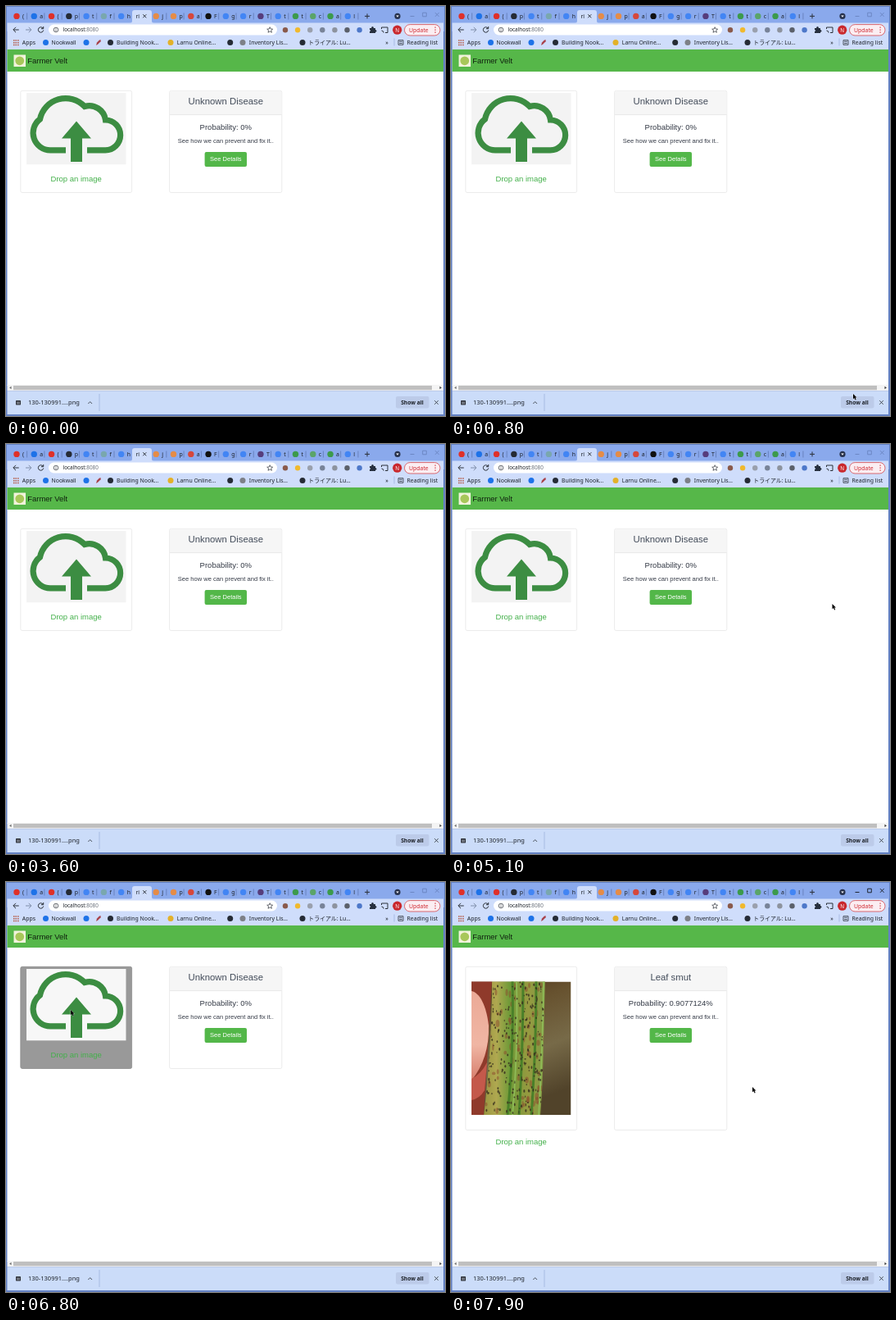
An HTML page for the animation above (8000 ms loop, 536 by 500 pixels).

```html
<!DOCTYPE html>
<html lang="en">
<head>
<meta charset="utf-8">
<title>Leaf check</title>
<style>
  html, body { margin: 0; width: 100%; height: 100%; overflow: hidden; background: #fff; }
  svg { display: block; }
  text { font-family: "Liberation Sans", Arial, sans-serif; font-size: 7.55px; fill: #343a46; }
  .ui text { font-family: "Noto Sans", "Noto Sans CJK JP", sans-serif; font-size: 6.9px; fill: #1c2128; }
  .mid { text-anchor: middle; }
  text.title { font-size: 11.35px; fill: #434c5a; }
  text.sub { font-size: 9.5px; }
  text.drop { font-size: 9.5px; fill: #43b04a; }
  .line { fill: none; stroke: #2b3038; stroke-width: 1; }
  .card { fill: #fff; stroke: #e6e6e6; stroke-width: .8; }
</style>
</head>
<body>
<svg width="536" height="500" viewBox="0 0 536 500">
  <defs>
    <linearGradient id="soil" x2=".3" y2="1">
      <stop offset="0" stop-color="#4f321c"/><stop offset=".3" stop-color="#67522f"/>
      <stop offset=".65" stop-color="#776a48"/><stop offset="1" stop-color="#51432a"/>
    </linearGradient>
    <linearGradient id="blade">
      <stop offset="0" stop-color="#96943f"/><stop offset=".22" stop-color="#b0a850"/><stop offset=".42" stop-color="#6f9a38"/>
      <stop offset=".7" stop-color="#969a40"/><stop offset="1" stop-color="#7d9a45"/>
    </linearGradient>
    <linearGradient id="skin" x2="0" y2="1">
      <stop offset="0" stop-color="#eba996"/><stop offset=".6" stop-color="#f0b6a4"/><stop offset="1" stop-color="#d67d6c"/>
    </linearGradient>
    <clipPath id="photoClip"><path d="M25 121.5h121.5V284H25z"/></clipPath>
    <clipPath id="bladeClip"><path d="M50 121H115C113 180 113 240 109 285H40C46 235 50 180 50 121z"/></clipPath>
  </defs>

  <rect width="536" height="500" fill="#6482c4"/>
  <rect x="1" y="1" width="534" height="30" fill="#8aa9ec"/>
  <rect x="1.5" y="53" width="532.5" height="410" fill="#fff"/>

  <g class="ui">
    <path d="M151 21q3 0 3-3V8q0-3 3-3h18q3 0 3 3v10q0 3 3 3z" fill="#cfddfb"/>
    <rect x="1.5" y="20.5" width="532.5" height="32.5" fill="#cfddfb"/>
    <g id="tabs"></g>
    <text x="158.5" y="14.8">ri</text>
    <path class="line" d="M167.3 10.3l4 4m0-4l-4 4M438 12.4h6m-3-3v6"/>
    <circle cx="478" cy="12.4" r="3.6" fill="#27324d"/>
    <path d="M476.2 11.5h3.6l-1.8 2.3z" fill="#fff"/>
    <path id="controls" class="line" d="M493.5 12.5h5M508.7 8.2h4.6v4.6h-4.6zM524 8.2l4.6 4.6m0-4.6L524 12.8"/>

    <path class="line" d="M15.7 29H9m3-3.2L8.8 29l3.2 3.2"/>
    <path class="line" d="M24 29h6.7m-3-3.2l3.2 3.2-3.2 3.2" style="stroke:#7f8da9"/>
    <path class="line" d="M45.2 27.2A3.2 3.2 0 1 0 45.7 29.5M45.7 25v2.7H43"/>
    <rect x="52" y="22.5" width="279" height="13" rx="6.5" fill="#fff"/>
    <circle class="line" cx="61" cy="29" r="2.8" style="stroke-width:.7"/>
    <path class="line" d="M61 28.5v2.2M61 27.1v.7" style="stroke-width:.7"/>
    <text x="69.5" y="31.4" style="font-size:6.4px">localhost<tspan fill="#6c737d">:8080</tspan></text>
    <path class="line" d="M322.2 25.7l1 2.3 2.5.2-1.9 1.6.6 2.5-2.2-1.4-2.2 1.4.6-2.5-1.9-1.6 2.5-.2z" style="stroke-width:.7"/>
    <g id="addons"></g>
    <path d="M444 27h2q.2-2 1.5-2t1.5 2h2v2q1.5.2 1.5 1.4T451 31.8V33h-7v-2q1.2-.3 1.2-1t-1.2-1z" fill="#27303e"/>
    <path class="line" d="M458.5 28v-2h7.5v6.5h-3M458.5 30q2.4 0 2.6 2.6"/>
    <circle cx="477.7" cy="29.2" r="5.6" fill="#c9282d"/>
    <text class="mid" x="477.7" y="31.6" style="fill:#fff;font-size:6.3px">N</text>
    <rect x="486.5" y="22.6" width="43.5" height="13.4" rx="6.7" fill="#fbeef2" stroke="#d65a60" stroke-width=".9"/>
    <text x="492" y="31.8" style="fill:#cf2830;font-weight:500">Update</text>
    <path d="M523.5 25.5h1.2v1.2h-1.2zm0 3h1.2v1.2h-1.2zm0 3h1.2v1.2h-1.2z" fill="#cf2830"/>

    <g id="bookmarks"></g>
    <path class="line" d="M9 42h6.5M9 44.7h6.5M9 47.4h6.5" stroke-dasharray="1.5 1" style="stroke:#b4543f;stroke-width:1.5"/>
    <path d="M110 48l1-3.5 3-3 1.8-.2-.2 2-3 3z" fill="#a9434b"/>
    <text x="463.3" y="47">»</text>
    <path d="M474 39.5v9" stroke="#9fb3df" stroke-width=".8"/>
    <path class="line" d="M479 41.7h6v5.6h-6zM480.2 43.3h3.6m-3.6 2.2h3.6" style="stroke-width:.8"/>
    <text x="489.5" y="47">Reading list</text>
  </g>

  <rect x="1.5" y="53" width="532.5" height="27" fill="#56b749"/>
  <rect x="9.5" y="59.5" width="14.5" height="14.5" fill="#f2f3dc"/>
  <circle cx="16.7" cy="66.8" r="5.4" fill="#a8c75a"/>
  <text x="26.3" y="70" style="font-size:9.45px;fill:#10200f">Farmer Velt</text>

  <rect id="dropCard" class="card" x="17.8" y="103.3" width="135.8" rx="2"/>
  <g id="cloud">
    <rect id="cloudBack" x="25" y="106" width="121.5" height="87.3"/>
    <path d="M73 175.8H54A21 21 0 0 1 41.5 138A32 32 0 0 1 96 122.5A20 20 0 0 1 121.5 139A18.4 18.4 0 0 1 121 175.8H99" fill="none" stroke="#3c8d42" stroke-width="7.2"/>
    <path d="M86 140.5L104 161.5H93V190H79V161.5H68z" fill="#3c8d42"/>
  </g>
  <g id="photo" clip-path="url(#photoClip)">
    <rect x="25" y="121.5" width="121.5" height="162.5" fill="url(#soil)"/>
    <path d="M25 121h25L40 285H25z" fill="#8f3a2b"/>
    <path d="M25 133C35 135 43 150 46 175Q47 215 25 242z" fill="url(#skin)"/>
    <path d="M25 240q12-6 19-20l-3 34q-6 10-16 12z" fill="#c4594b"/>
    <g clip-path="url(#bladeClip)">
      <rect x="38" y="121" width="80" height="164" fill="url(#blade)"/>
      <g id="patches" fill="#8c4a2c"></g>
      <path d="M75 121Q77 205 69 285M88 121Q88 205 83 285M104 121Q104 205 98 285" fill="none" stroke="#4a8029" stroke-width="3"/>
      <path d="M80 121Q82 205 75 285M113 121Q112 205 107 285" fill="none" stroke="#8fbb57" stroke-width="1.8"/>
      <g id="spots" fill="#3a321f"></g>
    </g>
  </g>
  <text id="dropText" class="drop mid" x="85.7">Drop an image</text>

  <rect id="resultCard" class="card" x="199.6" y="103.3" width="137.2" rx="2"/>
  <path d="M200 105.3q0-1.6 1.6-1.6h133.2q1.6 0 1.6 1.6V132.5H200z" fill="#f6f6f6"/>
  <path d="M200 132.6h136.4" stroke="#e2e2e2" stroke-width=".8"/>
  <text id="disease" class="title mid" x="268.3" y="119.7"></text>
  <text id="chance" class="sub mid" x="268.3" y="151"></text>
  <text class="mid" x="268.3" y="167">See how we can prevent and fix it..</text>
  <rect x="242.6" y="178" width="51.4" height="18" rx="2" fill="#53b749"/>
  <text class="mid" x="268.3" y="189.4" style="fill:#fff">See Details</text>

  <g class="ui">
    <rect x="1.5" y="462" width="532.5" height="7.5" fill="#f4f4f4"/>
    <rect x="9" y="463" width="511" height="5.2" fill="#bfbfbf"/>
    <path d="M6.5 463.8v3.4l-2.3-1.7z" fill="#666"/>
    <path d="M529.5 463.8v3.4l2.3-1.7z" fill="#333"/>
    <rect x="1.5" y="469.5" width="532.5" height="28.5" fill="#cbdcf9"/>
    <rect x="12" y="481" width="6" height="5.4" rx=".6" fill="#30343c"/>
    <path d="M13 483.2h4m-4 1.6h4" stroke="#b8bfcc" stroke-width=".7"/>
    <text x="27" y="486.3" style="font-size:7.5px">130-130991....png</text>
    <path class="line" d="M100.3 485l2.4-2.4 2.4 2.4" style="stroke-width:.8"/>
    <path d="M114 473v21" stroke="#9fb3df" stroke-width=".8"/>
    <rect x="476" y="476" width="40.5" height="14.5" rx="2" fill="#bccbe9"/>
    <text class="mid" x="496" y="486" style="font-weight:600;font-size:6.7px">Show all</text>
    <path class="line" d="M523.2 481.2l4.6 4.6m0-4.6l-4.6 4.6" style="stroke-width:.8"/>
  </g>

  <path id="cursor" d="M0 0V6.3L1.5 5 2.6 7.4 3.7 6.9 2.6 4.6H4.5z" fill="#000" stroke="#fff" stroke-width=".5" paint-order="stroke"/>
</svg>
<script>
  const $ = id => document.getElementById(id);
  const dot = (x, y, r, fill) => `<circle cx="${x}" cy="${y}" r="${r}" fill="${fill}"/>`;
  const label = (x, y, s) => `<text x="${x}" y="${y}">${s}</text>`;

  const RED = '#df3029', BLUE = '#1d72e8', SKY = '#4285f4', DARK = '#252b35', ORANGE = '#e58c47', GREEN = '#3c9a4c';
  const tabs = [
    [RED, '('], [BLUE, 'a'], [RED, '('], [DARK, 'p'], [SKY, 't'], ['#79a7ae', 'f'], [SKY, 'h'], null,
    [ORANGE, 'j'], [ORANGE, 'p'], ['#d6473c', 'a'], ['#111', 'F'], [SKY, 'g'], [SKY, 'r'], ['#563d7c', 'T'],
    [SKY, 't'], [GREEN, 't'], ['#5aa469', 'c'], [GREEN, 'a'], [SKY, 'l']
  ];
  $('tabs').innerHTML = tabs.map((tab, i) => {
    if (!tab) return '';
    const x = 13 + 21.28 * i;
    const edge = i === 6 ? '' : `<path d="M${x + 12.6} 8.5v8" stroke="#6079b4" stroke-width=".8"/>`;
    return dot(x, 12.4, 3.7, tab[0]) + label(x + 7, 14.8, tab[1]) + edge;
  }).join('');

  $('addons').innerHTML = ['#8a5a4b', '#f0b92e', '#9aa0ad', '#788398', '#8d939e', '#5b606a', '#4d78c9']
    .map((fill, i) => dot(341 + 15.1 * i, 29.2, 3.2, fill)).join('');

  const bookmarks = [
    [0, '', 19.8, 'Apps'], [48.5, BLUE, 55.5, 'Nookwall'], [98, BLUE], [127.5, DARK, 135, 'Building Nook…'],
    [201, '#e3b129', 208.8, 'Larnu Online…'], [273.7, DARK], [289, '#7d8087', 296.8, 'Inventory Lis…'],
    [362, DARK, 369.3, 'トライアル: Lu…']
  ];
  $('bookmarks').innerHTML = bookmarks.map(([x, fill, tx, name]) =>
    (fill ? dot(x, 44.6, 3.5, fill) : '') + (name ? label(tx, 47, name) : '')).join('');

  let seed = 7;
  const random = () => (seed = seed * 16807 % 2147483647) / 2147483647;
  const scatter = (count, size, opacity) => Array.from({ length: count }, () => {
    const x = 43 + 70 * random(), y = 122 + 162 * random();
    const rx = size * (.5 + .6 * random()), ry = size * (.8 + 1.3 * random());
    return `<ellipse cx="${x}" cy="${y}" rx="${rx}" ry="${ry}" opacity="${opacity}"/>`;
  }).join('');
  $('patches').innerHTML = scatter(75, 2.2, .5);
  $('spots').innerHTML = scatter(260, 1, .85);

  // Pointer waypoints: time, x, y
  const path = [
    [500, 520, 470], [800, 491, 473], [1300, 485, 471], [1500, 499, 432], [1700, 528, 411],
    [4500, 528, 411], [4600, 424, 136], [4900, 438, 153], [5100, 465.5, 195],
    [6700, 465.5, 195], [6800, 79, 156], [7100, 79, 156], [7600, 291, 229], [7900, 368, 250], [8000, 368, 250]
  ];
  function pointer(t) {
    const i = path.findIndex(p => p[0] > t);
    const [t0, x0, y0] = path[i - 1], [t1, x1, y1] = path[i];
    const k = (t - t0) / (t1 - t0);
    return [x0 + (x1 - x0) * k, y0 + (y1 - y0) * k];
  }
  const show = (id, on) => $(id).setAttribute('visibility', on ? 'visible' : 'hidden');

  function draw(now) {
    const t = Math.floor(now % 8000 / 100) * 100;
    const dropped = t >= 6900, hover = t >= 6200 && !dropped, solved = t >= 7300;
    const height = dropped ? 199.2 : 124.2;

    $('dropCard').setAttribute('height', height);
    $('resultCard').setAttribute('height', height);
    $('dropCard').style.fill = hover ? '#999' : '#fff';
    $('dropCard').style.stroke = hover ? '#8d8d8d' : '#e6e6e6';
    $('cloudBack').setAttribute('fill', hover ? '#f7f7f7' : '#f3f3f3');
    show('cloud', !dropped);
    show('photo', dropped);
    $('dropText').setAttribute('y', dropped ? 320.4 : 214.2);
    $('controls').style.stroke = dropped ? '#1f2530' : '#6c87c4';
    $('disease').textContent = solved ? 'Leaf smut' : 'Unknown Disease';
    $('chance').textContent = `Probability: ${solved ? '0.9077124' : '0'}%`;

    const visible = (t >= 500 && t < 3600) || t >= 4600;
    show('cursor', visible);
    if (visible) $('cursor').setAttribute('transform', `translate(${pointer(t)})`);
  }
  function tick() {
    draw(performance.now());
    requestAnimationFrame(tick);
  }
  tick();
</script>
</body>
</html>
```
